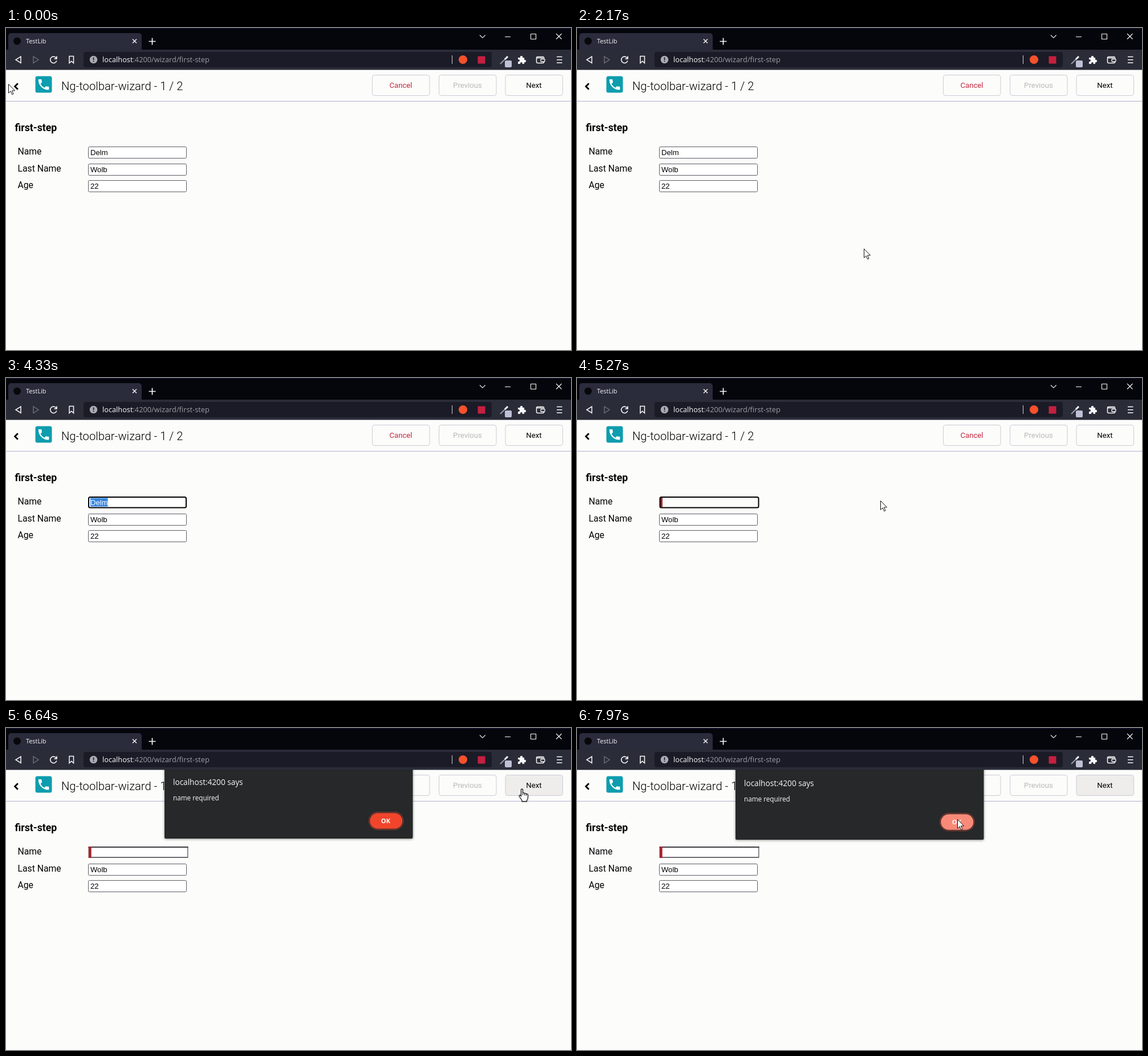
Animation of 991x565 px, one loop 8000 ms. Source, as an HTML page with a canvas:

```html
<!DOCTYPE html>
<html lang="en">
<head>
<meta charset="utf-8">
<title>Wizard form</title>
<style>
html, body { margin: 0; width: 100%; height: 100%; overflow: hidden; background: #fcfcfb; }
canvas { display: block; width: 991px; height: 565px; }
</style>
</head>
<body>
<canvas id="stage" width="991" height="565"></canvas>
<script>
const ctx = document.getElementById('stage').getContext('2d');
const LOOP = 8000;
const UI = '"Open Sans", sans-serif';
const PAGE = 'Roboto, sans-serif';
const FIELD = '"Liberation Sans", Arial, sans-serif';
const WHITE = '#fafafb';
const BAR = '#2a2c38', ADDRESS = '#1a1b26', ALERT = '#262829', PAPER = '#fcfcfb';

const FIRST_NAME = 'Delm';
const LAST_NAME = 'Wolb';

// Moments at which the form changes state
const FOCUS_AT = 3680, DELETE_AT = 4500, HOVER_AT = 5860, ALERT_AT = 6625;

// Pointer path: time, x, y
const PATH = [
  [0, 4, 98], [250, 4, 98], [830, 330, 262], [1130, 499, 377], [1650, 499, 377],
  [2100, 503, 387], [2500, 495, 383], [3030, 379, 269], [3330, 262, 232],
  [3600, 230, 217], [3750, 230, 217], [4100, 4, 219], [4250, -30, 222],
  [4550, -30, 300], [4750, 120, 355], [4970, 300, 270], [5500, 690, 180],
  [5860, 888, 122], [6100, 900, 115], [6640, 905, 107], [6950, 905, 107],
  [7650, 667, 160], [8000, 667, 160]
];

const PHONE = new Path2D('M6.62 10.79c1.44 2.83 3.76 5.14 6.59 6.59l2.2-2.2c.27-.27.67-.36 1.02-.24 1.12.37 2.33.57 3.57.57.55 0 1 .45 1 1V20c0 .55-.45 1-1 1-9.39 0-17-7.61-17-17 0-.55.45-1 1-1h3.5c.55 0 1 .45 1 1 0 1.25.2 2.45.57 3.57.11.35.03.74-.25 1.02l-2.2 2.2z');
const ARROW = new Path2D('M.5.5V16.2L4.1 12.8 6.7 18.7 9 17.7 6.5 11.9H11.5Z');
const HAND = new Path2D('M-1.5 13V1.5Q-1.5 0 0 0T1.5 1.5V7Q4.2 6 4.5 8Q7 7 7.4 9Q10.5 8 10.5 11V15Q10.5 18 8.5 20V22H0V20L-4.5 13.5Q-5.5 11 -3.5 10.7Q-2.5 10.8 -1.5 13Z');
const PUZZLE = new Path2D('M898 52H902Q901 49 904 49T906 52H909V56Q912 55 912 58T909 60V63H905.5Q906 60 904 60T902 63H898V59Q901 59 901 57T898 55Z');

function slope(i, k) {
  const a = PATH[i - 1], b = PATH[i], c = PATH[i + 1];
  if (!a || !c) return 0;
  const before = (b[k] - a[k]) / (b[0] - a[0]);
  const after = (c[k] - b[k]) / (c[0] - b[0]);
  return before * after <= 0 ? 0 : 2 * before * after / (before + after);
}

function pointer(t) {
  let i = 0;
  while (i < PATH.length - 2 && t >= PATH[i + 1][0]) i++;
  const a = PATH[i], b = PATH[i + 1], span = b[0] - a[0], u = (t - a[0]) / span;
  const ease = u * u * (3 - 2 * u);
  return [1, 2].map(k => a[k] + (b[k] - a[k]) * ease
    + span * (u * (1 - u) * (1 - u) * slope(i, k) - u * u * (1 - u) * slope(i + 1, k)));
}

function text(str, x, y, font, color, align = 'left') {
  ctx.font = font;
  ctx.fillStyle = color;
  ctx.textAlign = align;
  ctx.fillText(str, x, y);
}

function rect(x, y, w, h, color) {
  ctx.fillStyle = color;
  ctx.fillRect(x, y, w, h);
}

function box(x, y, w, h, r, fill, stroke, width = 1) {
  ctx.beginPath();
  ctx.roundRect(x, y, w, h, r);
  if (fill) { ctx.fillStyle = fill; ctx.fill(); }
  if (stroke) { ctx.strokeStyle = stroke; ctx.lineWidth = width; ctx.stroke(); }
}

function disc(x, y, r, color) {
  ctx.beginPath();
  ctx.arc(x, y, r, 0, Math.PI * 2);
  ctx.fillStyle = color;
  ctx.fill();
}

function line(d, color, width = 1) {
  ctx.strokeStyle = color;
  ctx.lineWidth = width;
  ctx.stroke(new Path2D(d));
}

function browserBar() {
  rect(0, 0, 991, 38, '#05050c');
  rect(0, 0, 991, 1, '#151538');
  box(4, 9, 234, 34, 5, '#2a2b3b');
  rect(0, 38, 991, 35.5, BAR);
  box(136, 42, 716, 27, 4, ADDRESS);

  disc(19.5, 23, 6.5, '#08080c');
  text('TestLib', 35, 27, '500 10.9px ' + UI, WHITE);
  line('M222 19.5l7 7m0-7l-7 7', WHITE, 1.4);
  line('M250.5 23.5h12m-6-6v12', WHITE, 1.7);

  line('M831 12.5l4.8 4.8 4.8-4.8', WHITE, 1.1);
  line('M875 15.5h10M920.5 10.5h9v9h-9zM965 10l9.5 9.5m0-9.5l-9.5 9.5', WHITE, 1.1);

  line('M26 50v11.5l-9-5.75z', WHITE, 1.5);
  line('M48 50v11.5l9-5.75z', '#6f7078', 1.4);
  line('M88.3 53A5.7 5.7 0 1 0 88.8 57.5M89 49.5v4.5h-4.5', WHITE, 1.6);
  line('M111 49.5h7.5v12l-3.75-3.2-3.75 3.2z', WHITE, 1.5);

  disc(153.5, 55.5, 6.8, '#a9aab2');
  rect(152.7, 51.5, 1.7, 4.8, ADDRESS);
  rect(152.7, 57.6, 1.7, 1.7, ADDRESS);
  text('localhost', 169, 60, '500 12.75px ' + UI, WHITE);
  const host = ctx.measureText('localhost').width;
  text(':4200/wizard/first-step', 169 + host, 60, '12.8px ' + UI, '#9d9ea6');

  rect(782, 48, 1, 15, '#d0d0d6');
  disc(801.5, 55.5, 7.6, '#f4512c');
  rect(827.5, 49.5, 13, 13, '#c5203f');

  line('M867 63l9-9', '#9a9cab', 2);
  line('M875 55l5-5', WHITE, 3);
  box(875, 57, 12, 12, 2, '#bfc0d4');
  ctx.fillStyle = WHITE;
  ctx.fill(PUZZLE);
  box(930.5, 50.5, 13, 11, 2, null, WHITE, 1.5);
  line('M931 52.5h11', WHITE, 1.5);
  box(938, 54.5, 7, 4.5, 1, BAR, WHITE, 1.3);
  line('M966 50.5h9.5m-9.5 5.2h9.5m-9.5 5.2h9.5', WHITE, 1.5);
}

function button(label, x, color, fill) {
  box(x + .5, 82.5, 100.5, 36, 4, fill, '#cbcbd6');
  text(label, x + 50.5, 105, '13.2px ' + PAGE, color, 'center');
}

function toolbar(hover) {
  line('M20.8 97.3l-5.2 5.2 5.2 5.2', '#000', 2.8);
  box(51.5, 84.5, 29, 29, 3.5, '#0e9dae');
  ctx.save();
  ctx.translate(53.7, 86.8);
  ctx.scale(1.03, 1.03);
  ctx.fillStyle = '#fff';
  ctx.fill(PHONE);
  ctx.restore();
  text('Ng-toolbar-wizard - 1 / 2', 97, 108.5, '300 20.2px ' + PAGE, '#000');
  button('Cancel', 642, '#c2283f', PAPER);
  button('Previous', 759, '#b9b9b9', PAPER);
  button('Next', 875.5, '#000', hover ? '#eeedec' : PAPER);
  rect(0, 128, 991, 1, '#b1b1cf');
}

function input(y, value) {
  box(144.5, y + .5, 172, 20, 2, '#fff', '#5c5c66');
  text(value, 148, y + 14.5, '13.1px ' + FIELD, '#000');
}

function selectedName(x) {
  box(145, 209, 171, 18.5, 2.5, '#fff', '#000', 2);
  const font = '13.1px ' + FIELD;
  ctx.font = font;
  const edge = n => 148 + ctx.measureText(FIRST_NAME.slice(0, n)).width;
  let n = FIRST_NAME.length;
  while (n > 0 && x < (edge(n) + edge(n - 1)) / 2) n--;
  const start = edge(n), end = edge(FIRST_NAME.length);
  if (end > start) rect(start, 210.5, end - start, 15, '#3585de');
  text(FIRST_NAME.slice(0, n), 148, 222.5, font, '#000');
  text(FIRST_NAME.slice(n), start, 222.5, font, '#fff');
}

function emptyName(focused) {
  if (focused) {
    rect(146, 210, 4, 16.5, '#a3262d');
    box(145.5, 209, 173, 18.5, 2.5, null, '#000', 2);
    return;
  }
  rect(144.5, 208, 175, 20, '#6c6c70');
  rect(144.5, 208, 175, 2, '#3c3c40');
  rect(149, 210, 169, 16, '#fff');
  rect(145, 208, 4.7, 20, '#a8232c');
}

function form(t, x) {
  text('first-step', 15.5, 181, '700 17.7px ' + PAGE, '#000');
  ['Name', 'Last Name', 'Age'].forEach((label, i) =>
    text(label, 20.5, Math.round(222 + 29.6 * i), '15.75px ' + PAGE, '#000'));
  if (t < FOCUS_AT) input(208, FIRST_NAME);
  else if (t < DELETE_AT) selectedName(x);
  else emptyName(t < ALERT_AT);
  input(238, LAST_NAME);
  input(267, '22');
}

function alertBox(t, x, y) {
  const drop = -2 * Math.max(0, 1 - Math.max(0, t - 6645) / 60);
  const hover = x > 637 && x < 697 && y > 150 && y < 180;
  ctx.save();
  ctx.beginPath();
  ctx.rect(0, 73, 991, 492);
  ctx.clip();
  ctx.translate(0, drop);
  ctx.shadowColor = 'rgba(0,0,0,.45)';
  ctx.shadowBlur = 4;
  ctx.shadowOffsetY = 1;
  box(278, 60, 435.5, 136, 2, ALERT);
  ctx.shadowColor = 'transparent';
  text('localhost:4200 says', 293, 102, '500 13.6px ' + UI, WHITE);
  text('name required', 293, 129, '500 11.7px ' + UI, WHITE);
  box(636.7, 149.7, 60.2, 30.6, 15, null, '#8a3a30', 1.2);
  box(638.2, 151.2, 57.2, 27.6, 13.8, hover ? '#f98a78' : '#f0452b');
  text('OK', 666, 169, '700 11.2px ' + UI, '#fff', 'center');
  ctx.restore();
}

function cursor(t, x, y) {
  ctx.save();
  ctx.translate(Math.round(x), Math.round(y));
  ctx.lineJoin = 'round';
  const onField = x > 145 && x < 317 && y > 208 && y < 228;
  const dragging = t > FOCUS_AT && t < 4300;
  if (onField || dragging) {
    line('M-3-8h2.5l.5.5.5-.5h2.5M0-8v16M-3 8h2.5l.5-.5.5.5h2.5', '#111');
  } else {
    const shape = t >= HOVER_AT && t < 6950 ? HAND : ARROW;
    ctx.fillStyle = '#fff';
    ctx.fill(shape);
    ctx.strokeStyle = '#111';
    ctx.lineWidth = shape === HAND ? 1.3 : 1;
    ctx.stroke(shape);
    if (shape === HAND) line('M1.5 7v4M4.5 8v3.5M7.4 9v3', '#111');
  }
  ctx.restore();
}

function draw(t) {
  const [x, y] = pointer(t);
  rect(0, 0, 991, 565, PAPER);
  browserBar();
  toolbar(t >= HOVER_AT);
  form(t, x);
  if (t >= ALERT_AT) alertBox(t, x, y);
  cursor(t, x, y);
}

const begin = performance.now();
function tick() {
  draw((performance.now() - begin) % LOOP);
  requestAnimationFrame(tick);
}
tick();
</script>
</body>
</html>
```
